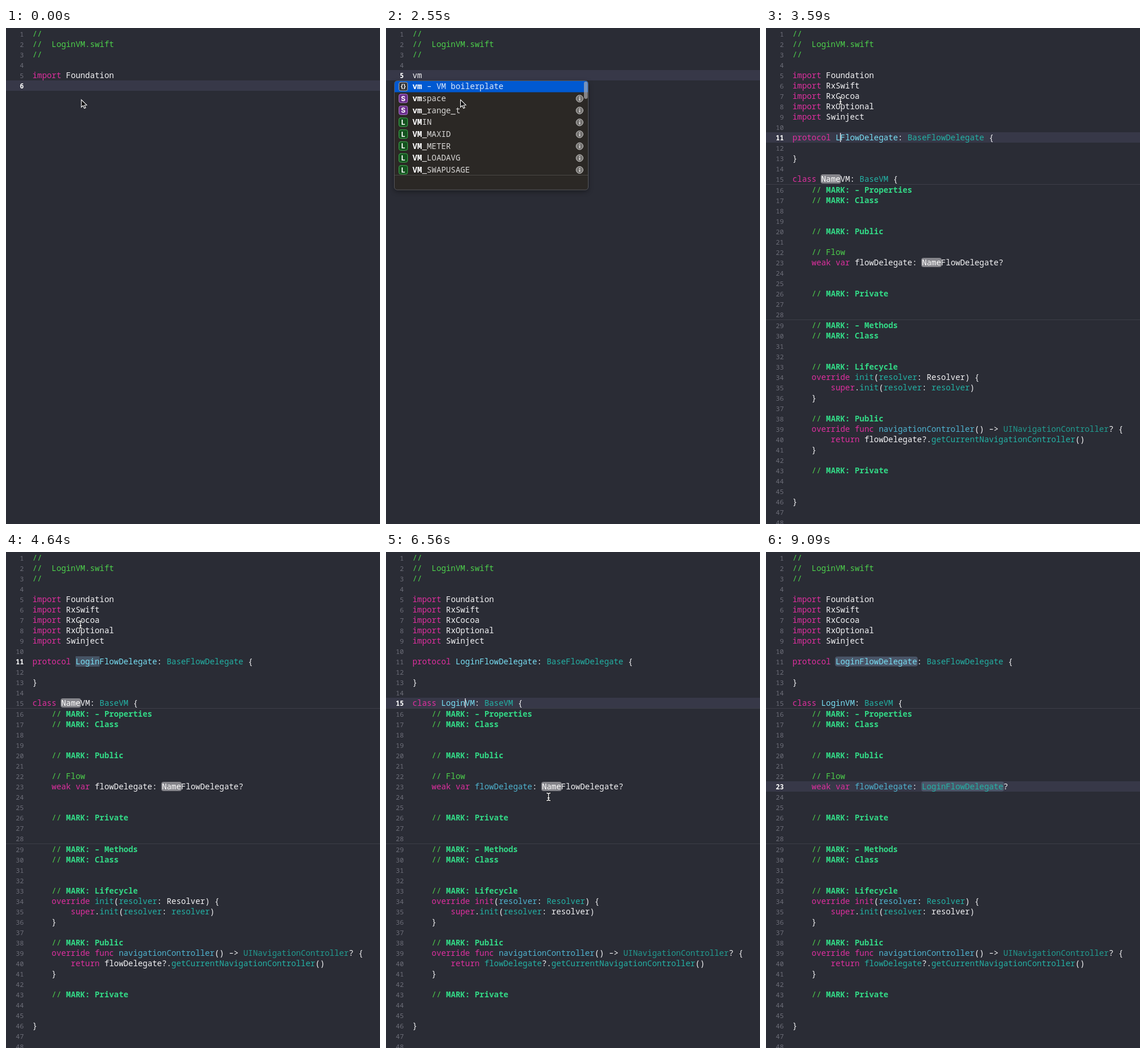
These frames come from a looping animation (650x861 px, 9190 ms). An HTML page with a canvas:

```html
<!DOCTYPE html>
<html lang="en">
<head>
<meta charset="utf-8">
<title>Code snippet</title>
<style>
html, body { margin: 0; width: 100%; height: 100%; overflow: hidden; background: #2a2c35; }
canvas { display: block; width: 650px; height: 861px; }
</style>
</head>
<body>
<canvas id="stage"></canvas>
<script>
(() => {
const W = 650, H = 861, LOOP = 9190;
const LEFT = 46, CH = 8.33;
const MONO = '"Noto Sans Mono", "DejaVu Sans Mono", monospace';
const canvas = document.getElementById('stage');
const g = canvas.getContext('2d');
const dpr = window.devicePixelRatio || 1;
canvas.width = W * dpr;
canvas.height = H * dpr;
g.scale(dpr, dpr);

// Style keys used in the code markup: "~" + key + text
const COLORS = {
  w: '#f4f4f6', k: '#df2f9f', c: '#4dcf4b', m: '#33d986', t: '#23b2a5',
  u: '#219c90', d: '#78dff4', f: '#4fb4d0', p: '#ffffff', s: '#ffffff'
};
const SELECT = '#465465';

const lineTop = n => 18 * n - 17 + (n > 15) + (n > 28);
const col = c => LEFT + c * CH;
const during = (t, a, b) => t >= a && t < b;

function rect(x, y, w, h, fill, r = 0, stroke) {
  g.beginPath();
  g.roundRect(x, y, w, h, r);
  if (fill) { g.fillStyle = fill; g.fill(); }
  if (stroke) { g.strokeStyle = stroke; g.lineWidth = 1; g.stroke(); }
}

function text(str, x, y, color, weight = 400, size = 13.88) {
  g.font = `${weight} ${size}px ${MONO}`;
  g.fillStyle = color;
  g.fillText(str, x, y);
}

function codeLine(n, markup) {
  let c = 0;
  for (const run of markup.split('~').slice(1)) {
    const key = run[0], str = run.slice(1);
    const x = col(c), y = lineTop(n);
    if (key === 'p' || key === 's')
      rect(x - 1, y + 1, str.length * CH + 2, 16, key === 'p' ? '#85858b' : '#5c7fa3', 4);
    const weight = key === 'm' ? 700 : key === 'd' ? 500 : 400;
    text(str, x, y + 14, COLORS[key], weight);
    c += str.length;
  }
}

function header() {
  codeLine(1, '~c//');
  codeLine(2, '~c//  LoginVM.swift');
  codeLine(3, '~c//');
}

function numbers(count, current) {
  g.textAlign = 'right';
  for (let n = 1; n <= count; n++) {
    const on = n === current;
    text(n, 31, lineTop(n) + 14, on ? '#ffffff' : '#6d6e79', on ? 600 : 400, 11.6);
  }
  g.textAlign = 'left';
}

const highlight = n => rect(0, lineTop(n), W, 18, '#373848');
const caret = (n, c) => rect(col(c) - 0.5, lineTop(n) + 1, 1.3, 16, '#f0f0f4');
const mark = (n, c, len) => rect(col(c) - 1, lineTop(n) + 0.5, len * CH + 2, 17, '#4a5568', 4);

function firstPart(t) {
  if (t < 900) highlight(6);
  else if (!during(t, 1050, 1800)) highlight(5);
  if (during(t, 1050, 1800)) rect(LEFT, lineTop(5), W - LEFT, 18, SELECT);
  numbers(6, t < 900 ? 6 : 5);
  header();
  if (t < 1800) codeLine(5, '~kimport ~wFoundation');
  else codeLine(5, t < 1950 ? '~wv' : '~wvm');
  if (during(t, 150, 900)) caret(6, 0);
  if (during(t, 900, 1050)) caret(5, 0);
  if (during(t, 1800, 2400)) caret(5, t < 1950 ? 1 : 2);
  if (t >= 2250) popup();
}

function icon(kind, y) {
  const [fill, edge] = {
    S: ['#6a2f8d', '#b27ad0'], L: ['#14521f', '#3fae50'], '{}': ['#35373a', '#a9abb0']
  }[kind];
  rect(22.5, y - 7.5, 15, 15, fill, 3, edge);
  g.font = `700 ${kind === '{}' ? 10 : 12}px Inter, sans-serif`;
  g.fillStyle = '#fff';
  g.textAlign = 'center';
  g.fillText(kind, 30, y + (kind === '{}' ? 3.3 : 4.4));
  g.textAlign = 'left';
}

function info(y) {
  g.beginPath();
  g.arc(336.5, y, 6, 0, 7);
  g.fillStyle = '#73716f';
  g.fill();
  g.strokeStyle = '#c9c8c6';
  g.lineWidth = 1;
  g.stroke();
  rect(335.7, y - 3.5, 1.7, 1.7, '#e4e4e4');
  rect(335.7, y - 0.8, 1.7, 4.2, '#e4e4e4');
}

const ITEMS = [
  ['{}', 'vm', ' – VM boilerplate'], ['S', 'vm', 'space'], ['S', 'vm', '_range_t'],
  ['L', 'VM', 'IN'], ['L', 'VM', '_MAXID'], ['L', 'VM', '_METER'],
  ['L', 'VM', '_LOADAVG'], ['L', 'VM', '_SWAPUSAGE']
];

function popup() {
  g.save();
  g.shadowColor = 'rgba(0,0,0,.4)';
  g.shadowBlur = 9;
  g.shadowOffsetY = 3;
  rect(14.5, 91.5, 337, 189.5, '#2b2825', 5);
  g.restore();
  g.save();
  g.beginPath();
  g.roundRect(14.5, 91.5, 337, 189.5, 5);
  g.clip();
  rect(15, 92, 336, 19.5, '#0059d1');
  rect(15, 255, 336, 1, '#4a4845');
  ITEMS.forEach(([kind, bold, rest], i) => {
    const y = 101.6 + i * 20.65;
    icon(kind, y);
    text(bold, LEFT, y + 4.8, '#ffffff', 700);
    text(rest, col(2), y + 4.8, i ? '#d9d8d7' : '#dbe8fb');
    if (i) info(y + 0.3);
  });
  rect(344, 93, 6.5, 30, 'rgba(175,175,180,.68)', 3.2);
  g.restore();
  rect(14.5, 91.5, 337, 189.5, null, 5, '#56575b');
}

function snippet(t) {
  const typed = t < 3590 ? 0 : Math.min(5, 1 + Math.floor((t - 3590) / 150));
  const classDone = t >= 6120, flowDone = t >= 7310;
  const colored = t >= 6270;
  const linked = t >= 8050;

  if (during(t, 3590, 4640)) highlight(11);
  if (during(t, 6120, 7010)) highlight(15);
  if (flowDone) highlight(23);
  rect(0, 271, W, 1, '#3d3e48');
  rect(0, 506, W, 1, '#3d3e48');
  if (during(t, 4640, 5530)) rect(col(9), lineTop(11), 5 * CH, 18, SELECT);
  if (linked) { mark(11, 9, 17); mark(23, 27, 17); }
  numbers(48, t < 5530 ? 11 : t < 7010 ? 15 : 23);

  header();
  ['Foundation', 'RxSwift', 'RxCocoa', 'RxOptional', 'Swinject']
    .forEach((lib, i) => codeLine(5 + i, '~kimport ~w' + lib));

  const proto = typed ? '~d' + 'Login'.slice(0, typed) : '~sName';
  codeLine(11, `~kprotocol ${proto}~dFlowDelegate~w: ~tBaseFlowDelegate~w {`);
  codeLine(13, '~w}');

  const cls = !classDone ? (t >= 5530 ? '~sName' : '~pName') + '~wVM'
    : colored ? '~dLoginVM' : '~wLoginVM';
  codeLine(15, `~kclass ${cls}~w: ~tBaseVM~w {`);

  const marks = {
    16: '– Properties', 17: 'Class', 20: 'Public', 26: 'Private', 29: '– Methods',
    30: 'Class', 33: 'Lifecycle', 38: 'Public', 43: 'Private'
  };
  for (const n in marks) codeLine(+n, `~c    // ~mMARK: ${marks[n]}`);

  codeLine(22, '~c    // Flow');
  const type = !flowDone ? (t >= 7010 ? '~sName' : '~pName') + '~wFlowDelegate'
    : (t >= 7460 ? '~t' : '~w') + 'LoginFlowDelegate';
  codeLine(23, `~k    weak var ${colored ? '~f' : '~w'}flowDelegate~w: ${type}~w?`);

  codeLine(34, `~k    override ${colored ? '~k' : '~t'}init~w(${colored ? '~f' : '~t'}resolver~w: ` +
    `${t >= 5670 ? '~t' : '~w'}Resolver~w) {`);
  codeLine(35, `~k        super~w.~tinit~w(~tresolver~w: ${colored ? '~w' : '~t'}resolver~w)`);
  codeLine(36, '~w    }');
  codeLine(39, '~k    override func ~fnavigationController~w() –> ~uUINavigationController~w? {');
  codeLine(40, `~k        return ${colored ? '~t' : '~w'}flowDelegate~w?.~tgetCurrentNavigationController~w()`);
  codeLine(41, '~w    }');
  codeLine(46, '~w}');

  if (during(t, 3590, 4640)) caret(11, 9 + typed);
  if (during(t, 6120, 7010)) caret(15, 11);
  if (during(t, 7310, 8490) || during(t, 8790, 9090)) caret(23, 32);
}

function arrow(x, y) {
  g.beginPath();
  [[0, 0], [0, 13], [3, 10.2], [5.2, 15], [7.4, 14], [5.3, 9.4], [9.3, 9.2]]
    .forEach(([dx, dy]) => g.lineTo(x + dx, y + dy));
  g.closePath();
  g.fillStyle = '#08080a';
  g.fill();
  g.strokeStyle = '#fff';
  g.lineWidth = 1.1;
  g.stroke();
}

function beam(x, y) {
  g.beginPath();
  for (const s of [-1, 1]) {
    g.moveTo(x - 3, y + 6.5 * s);
    g.quadraticCurveTo(x, y + 6.5 * s, x, y + 4.5 * s);
    g.quadraticCurveTo(x, y + 6.5 * s, x + 3, y + 6.5 * s);
  }
  g.moveTo(x, y - 5);
  g.lineTo(x, y + 5);
  g.moveTo(x - 1.5, y + 2);
  g.lineTo(x + 1.5, y + 2);
  g.lineCap = 'round';
  g.strokeStyle = '#111216';
  g.lineWidth = 3;
  g.stroke();
  g.strokeStyle = '#fff';
  g.lineWidth = 1.3;
  g.stroke();
}

// Pointer positions: start time, x, y
const PATH = [
  [0, 129.5, 126], [4940, 127, 150], [5090, 121, 196], [5240, 115, 240], [5390, 112, 263],
  [6410, 205, 352], [6560, 282.5, 425], [6710, 286, 416], [6860, 288, 408],
  [7610, 272, 520], [7760, 236, 700], [7900, 216, 820],
  [8340, 400, 836], [8490, 631, 847], [8790, 629, 857], [8940, 629, 880]
];

function pointer(t) {
  if (t < 300) return arrow(131, 124.5);
  if (during(t, 2400, 2690)) return arrow(129.5, 124.5);
  const [, x, y] = PATH.filter(p => p[0] <= t).pop();
  beam(x, y);
}

function draw(t) {
  rect(0, 0, W, H, '#2a2c35');
  if (t < 2690) firstPart(t);
  else snippet(t);
  pointer(t);
}

let start;
function tick(now) {
  start ??= now;
  draw((now - start) % LOOP);
  requestAnimationFrame(tick);
}
draw(0);
requestAnimationFrame(tick);
})();
</script>
</body>
</html>
```
